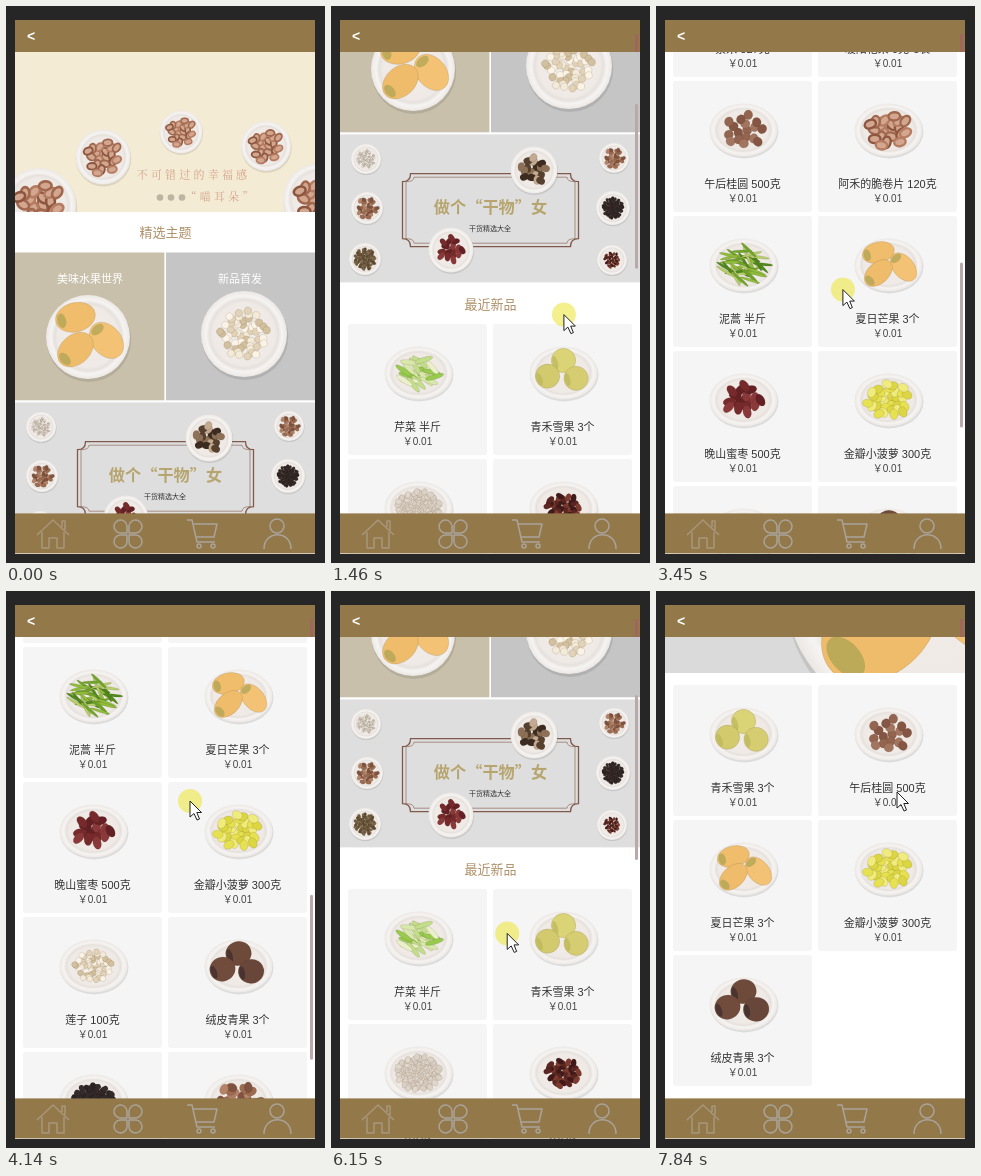
An HTML page for the animation above (8000 ms loop, 319 by 557 pixels).

```html
<!DOCTYPE html>
<html lang="zh">
<head>
<meta charset="utf-8">
<title>零食小铺</title>
<style>
  html, body { margin: 0; width: 100%; height: 100%; overflow: hidden; background: #262626; }
  svg { display: block; width: 319px; height: 557px; }
  text { font-family: "Liberation Sans", "Noto Sans CJK SC", "Noto Sans CJK", sans-serif; text-anchor: middle; }
  .name { font-size: 11px; fill: #333; }
  .price { font-size: 10px; fill: #444; }
  .title { font-size: 13px; fill: #ae9068; }
  .tile { font-size: 11px; fill: #fff; }
  .slogan { font-family: "Noto Serif CJK SC", "Noto Sans CJK SC", serif; font-size: 11px; font-weight: 300; fill: #d3a18a; letter-spacing: 3.2px; }
  .headline { font-family: "Noto Sans CJK SC", "Noto Sans CJK", sans-serif; font-size: 16.2px; font-weight: 900; fill: #b7a56f; }
  .icon { fill: none; stroke: #aaa39a; stroke-width: 1.5; stroke-linejoin: round; }
</style>
</head>
<body>
<svg viewBox="0 0 319 557">
  <defs>
    <clipPath id="phone"><rect x="9" y="14" width="300" height="534"/></clipPath>
    <clipPath id="hero"><rect x="9" y="46" width="300" height="160"/></clipPath>
    <radialGradient id="china">
      <stop offset="0" stop-color="#f1ece8"/><stop offset=".72" stop-color="#efeae6"/>
      <stop offset=".8" stop-color="#e6e1dd"/><stop offset=".88" stop-color="#f6f4f2"/>
      <stop offset="1" stop-color="#ebe7e4"/>
    </radialGradient>
  </defs>
  <g clip-path="url(#phone)">
    <rect x="9" y="14" width="300" height="534" fill="#fff"/>
    <g id="home"></g>
    <g id="theme"></g>
    <rect id="thumb" x="304" width="3" height="165" rx="1.5" fill="#b9a9aa"/>
    <rect x="9" y="14" width="300" height="32" fill="#937849"/>
    <rect id="trace" x="304" y="28" width="3" height="18" fill="#a0655c"/>
    <text x="25" y="34.500" font-size="14" font-weight="bold" fill="#fff">&lt;</text>
    <rect x="9" y="507.400" width="300" height="40" fill="#937849"/>
    <g class="icon">
      <path stroke="#a8967c" d="M31 529 47 514 63 529M36 526V542H43V532H51V542H58V526M56 521V515H59V524"/>
      <path d="M121 527H114A6.500 6.500 0 1 1 121 520ZM123 527V520A6.500 6.500 0 1 1 130 527ZM121 529V536A6.500 6.500 0 1 1 114 529ZM123 529H130A6.500 6.500 0 1 1 123 536Z"/>
      <path d="M181 514H186L191 536H209M187 518H211L208 531H190"/>
      <circle cx="193" cy="540" r="2"/><circle cx="207" cy="540" r="2"/>
      <circle cx="271" cy="520" r="7"/><path d="M258 543C258 524 285 524 285 543"/>
    </g>
  </g>
  <g id="cursor">
    <circle id="press" r="12" fill="#ece63a" fill-opacity=".58"/>
    <path d="M0 0V16L4 12.500 7 19 9.500 18 6.800 11.500H11.500Z" fill="#fff" stroke="#222" stroke-width="1"/>
  </g>
</svg>
<script>
const $ = id => document.getElementById(id);

// x, y, turn of three large fruits; positions relative to the plate
const SIDEWAYS = [[-.3, -.47, -14], [.44, .08, 50], [-.3, .3, -42]];
const STACKED = [[0, -.47, -15], [-.47, .12, -20], [.37, .2, -10]];

// count, piece size (rx, ry), spread, colours, style or layout, tip colour; sizes relative to the plate
const FOODS = {
  celery: [24, .28, .075, .52, ['#d9e9ad', '#97ca4d', '#eaf1c9', '#c3de8a'], 'stick'],
  herb: [38, .3, .04, .6, ['#6fa62a', '#8fbd3c', '#4f8a1e', '#b5cf6c'], 'stick'],
  pear: [3, .36, .4, .4, ['#dbd476', '#d3ca6d', '#d6cd72'], STACKED, '#b9b65a'],
  mango: [3, .48, .35, .46, ['#f0bd6c', '#f3c274', '#efbc6c'], SIDEWAYS, '#a9a352'],
  kiwi: [3, .38, .4, .46, ['#6d4a3a', '#714c3c', '#69463a'], STACKED, '#3c2b2c'],
  rice: [130, .1, .08, .64, ['#ddd3c8', '#e1d7cc', '#dbd0c4']],
  grain: [60, .08, .06, .6, ['#d9d2c8', '#c9c0b4', '#efeae2']],
  goji: [34, .12, .08, .5, ['#5b2522', '#41191a', '#7d3a30']],
  longan: [17, .13, .14, .62, ['#936450', '#845643', '#a27560']],
  date: [16, .19, .12, .54, ['#772a2c', '#642025', '#8b383a']],
  pine: [32, .16, .12, .64, ['#e6e150', '#efeb7c', '#dcd642']],
  ear: [20, .17, .12, .62, ['#a0684f', '#b67c62', '#8d563f'], 'ring'],
  lotus: [52, .085, .085, .56, ['#f3ead8', '#e2d3b8', '#faf3e6', '#d3c09f']],
  nut: [28, .16, .12, .64, ['#9c6b52', '#b4836a', '#7f5340']],
  shroom: [18, .19, .15, .56, ['#56402f', '#8c7158', '#3c2b20', '#c2ab92']],
  bean: [110, .09, .08, .6, ['#2b2226', '#332a2e']],
  pepper: [80, .1, .09, .66, ['#6f5c42', '#5e4a34', '#7d6a4c']]
};

const ellipse = (x, y, rx, ry, attrs) =>
  `<ellipse cx="${x.toFixed(1)}" cy="${y.toFixed(1)}" rx="${rx.toFixed(1)}" ry="${ry.toFixed(1)}" ${attrs}/>`;
const rect = (x, y, w, h, fill, rx = 0) =>
  `<rect x="${x}" y="${y}" width="${w}" height="${h}" fill="${fill}" rx="${rx}"/>`;
const text = (x, y, cls, str) => `<text x="${x}" y="${y}" class="${cls}">${str}</text>`;

function random(seed) {
  return () => (seed = seed * 16807 % 2147483647) / 2147483647;
}

function plate(x, y, r, food, ry = r) {
  const [n, a, b, spread, colours, style, tip] = FOODS[food];
  const rnd = random(n * 977 + 31), large = Array.isArray(style);
  let out = ellipse(x + r * .02, y + ry * .06, r * 1.01, ry * 1.01, 'fill="#000" fill-opacity=".1"')
    + ellipse(x, y, r, ry, 'fill="url(#china)"');
  for (let i = 0; i < n; i++) {
    const angle = i * 2.4 + rnd() * .5, reach = spread * Math.sqrt((i + .5) / n);
    const [dx, dy, turn] = large ? style[i]
      : [Math.cos(angle) * reach, Math.sin(angle) * reach, style === 'stick' ? rnd() * 90 - 20 : rnd() * 180];
    const px = x + dx * r, py = y + dy * ry, colour = colours[i % colours.length];
    const spin = `transform="rotate(${turn.toFixed(0)} ${px.toFixed(1)} ${py.toFixed(1)})"`;
    const paint = style === 'ring'
      ? `fill="#d3a78f" stroke="${colour}" stroke-width="${(r * .07).toFixed(1)}"`
      : `fill="${colour}" stroke="#4a3010" stroke-opacity=".2" stroke-width=".6"`;
    out += ellipse(px, py, a * r, b * (large ? (r + ry) / 2 : r), `${paint} ${spin}`);
    if (tip) out += ellipse(px - a * r * .7, py, a * r * .22, b * r * .5, `fill="${tip}" fill-opacity=".7" ${spin}`);
  }
  return out;
}

const GOODS = [
  ['芹菜 半斤', 'celery'], ['青禾雪果 3个', 'pear'],
  ['素米 327克', 'rice'], ['暖阳杞果 6克*3袋', 'goji'],
  ['午后桂圆 500克', 'longan'], ['阿禾的脆卷片 120克', 'ear'],
  ['泥蒿 半斤', 'herb'], ['夏日芒果 3个', 'mango'],
  ['晚山蜜枣 500克', 'date'], ['金瓣小菠萝 300克', 'pine'],
  ['莲子 100克', 'lotus'], ['绒皮青果 3个', 'kiwi'],
  ['黑豆 125克', 'bean'], ['红糖 200克', 'nut'],
  ['香菇 300克', 'shroom'], ['花椒 50克', 'pepper']
];

const grid = (goods, top) => goods.map(([name, food], i) => {
  const x = i % 2 ? 162 : 17, y = top + (i >> 1) * 135, mid = x + 69.5;
  return rect(x, y, 139, 131, '#f5f5f5', 3) + plate(mid + 1, y + 49, 34, food, 26.5)
    + text(mid, y + 107, 'name', name) + text(mid, y + 121, 'price', '￥0.01');
}).join('');

const hero = body => `<g clip-path="url(#hero)">${body}</g>`;

function dryGoods() {
  const border = (d, w) => `<path d="M${79 + d} ${39 + d}H${239 - d}Q${239 - d} 47 ${247 - d} 47V104Q${239 - d} 104 ${239 - d} ${112 - d}H${79 + d}Q${79 + d} 104 ${71 + d} 104V47Q${79 + d} 47 ${79 + d} ${39 + d}Z" fill="none" stroke="#81594b" stroke-width="${w}"/>`;
  return `<g transform="translate(0 396)">${rect(9, 0.4, 300, 148, '#dedede')}`
    + `<g transform="translate(.5 .7)">${border(0, 1.3)}${border(3.5, .6)}</g>`
    + plate(35, 25, 15, 'grain') + plate(36, 74, 16, 'nut') + plate(34, 125, 16, 'pepper')
    + plate(283, 24, 15, 'nut') + plate(282, 74, 17, 'bean') + plate(281, 126, 15, 'goji')
    + plate(203, 36, 23.5, 'shroom') + plate(120, 116, 22.5, 'date')
    + text(159.5, 79, 'headline', '做个“干物”女')
    + '<text x="159" y="97" font-size="7" fill="#333">干货精选大全</text></g>';
}

$('home').innerHTML = hero(
    rect(9, 46, 300, 160, '#f4ebd4')
    + plate(33, 199, 37, 'ear') + plate(97, 151, 27.5, 'ear') + plate(175, 126, 21.5, 'ear')
    + plate(260, 140, 25, 'ear') + plate(313, 193, 36, 'ear')
    + text(187.5, 173, 'slogan', '不可错过的幸福感') + text(215, 195, 'slogan', '“喵耳朵”')
    + [154, 165, 176].map(x => ellipse(x, 191.5, 3.3, 3.3, 'fill="#bdb4a2"')).join(''))
  + text(159.5, 231, 'title', '精选主题')
  + rect(9, 246.5, 149.4, 147.8, '#c8c0ab') + rect(160, 246.5, 149, 147.8, '#c5c5c5')
  + plate(82, 331, 42, 'mango') + plate(238, 328, 43, 'lotus')
  + text(84, 277, 'tile', '美味水果世界') + text(234, 277, 'tile', '新品首发')
  + dryGoods() + text(159.5, 571, 'title', '最近新品') + grid(GOODS, 586);

$('theme').innerHTML = hero(rect(9, 46, 300, 160, '#dadada') + plate(265, 118, 137, 'mango'))
  + grid([1, 4, 7, 9, 11].map(i => GOODS[i]), 218);

const LOOP = 8000, GLIDE = 311, PAGE_SWITCH = 7000;
// start, end, x0, y0, x1, y1, distance glided after release
const DRAGS = [
  [450, 850, 235, 451, 240, 310, 81],
  [1250, 1688, 229, 377, 237, 235, 200],
  [2500, 2750, 205, 385, 200, 270, 63],
  [3200, 3600, 185, 375, 188, 229.4, 120],
  [4150, 4480, 184, 210, 180, 320, -73.5],
  [5100, 5400, 181, 201, 172, 370, -251],
  [5850, 6280, 172, 230, 178, 390.5, -215],
  [6880, 6960, 85, 270, 85, 270, 0],
  [7350, 7600, 240, 320, 241, 201, 10]
];
const mix = (a, b, k) => a + (b - a) * k;
const clamp = (v, lo, hi) => Math.min(hi, Math.max(lo, v));
const smooth = k => k * k * (3 - 2 * k);

function scrollAt(t) {
  let s = 0;
  DRAGS.forEach(([t0, t1, , y0, , y1, glide], i) => {
    if (t < t0 || (t >= PAGE_SWITCH && t0 < PAGE_SWITCH)) return;
    s += (y0 - y1) * clamp((t - t0) / (t1 - t0), 0, 1);
    const until = Math.min(t, DRAGS[i + 1]?.[0] ?? LOOP);
    if (until > t1) s += glide * (1 - Math.exp((t1 - until) / GLIDE));
  });
  return clamp(s, 0, t < PAGE_SWITCH ? 1194 : 124);
}

function pointerAt(t) {
  let from = [275, 572];
  for (let i = 0; i < DRAGS.length; i++) {
    const [t0, t1, x0, y0, x1, y1] = DRAGS[i];
    if (t < t0) {
      const k = i ? smooth(clamp((t - t0 + 190) / 160, 0, 1)) : clamp((t - 50) / 240, 0, 1);
      return { x: mix(from[0], x0, k), y: mix(from[1], y0, k), down: t > t0 - (i ? 30 : 155) };
    }
    if (t < t1) {
      const k = (t - t0) / (t1 - t0);
      return { x: mix(x0, x1, k), y: mix(y0, y1, k), down: true };
    }
    from = [x1, y1];
  }
  return { x: from[0], y: from[1], down: false };
}

const show = (id, on) => $(id).setAttribute('visibility', on ? 'visible' : 'hidden');
const start = performance.now();

function draw(now) {
  const t = Math.max(0, now - start) % LOOP;
  const first = t < PAGE_SWITCH, s = scrollAt(t), p = pointerAt(t);
  show('home', first);
  show('theme', !first);
  $(first ? 'home' : 'theme').setAttribute('transform', `translate(0 ${-Math.round(s)})`);
  $('thumb').setAttribute('y', (15 + s * .309).toFixed(1));
  show('thumb', first && t > 450);
  show('trace', t > 500);
  show('cursor', t >= 70);
  show('press', t >= 70 && p.down);
  $('cursor').setAttribute('transform', `translate(${p.x.toFixed(1)} ${p.y.toFixed(1)})`);
  requestAnimationFrame(draw);
}
draw(start);
</script>
</body>
</html>
```
